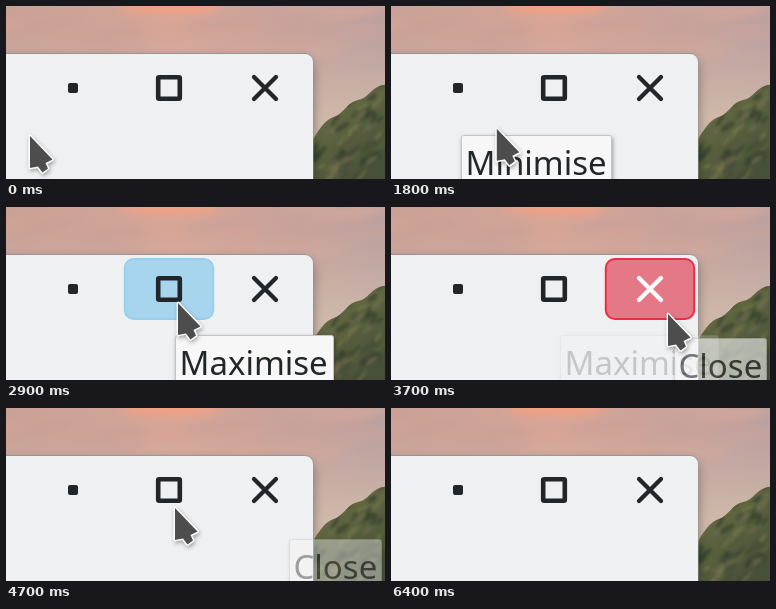
Recreate the animation shown at these times as an HTML page. Size 379x173 px, loop 6.7 s.

```html
<!DOCTYPE html>
<html lang="en">
<head>
<meta charset="utf-8">
<title>Title bar buttons</title>
<style>
  html, body { margin: 0; width: 100%; height: 100%; overflow: hidden; }
  svg { display: block; width: 379px; height: 173px; }
  text { font: 33px "Noto Sans", sans-serif; fill: #232629; }
</style>
</head>
<body>
<svg viewBox="0 0 379 173">
  <defs>
    <linearGradient id="sky">
      <stop stop-color="#c9a197"/>
      <stop offset=".45" stop-color="#d6a597"/>
      <stop offset="1" stop-color="#bba09f"/>
    </linearGradient>
    <linearGradient id="haze" x2="0" y2="1">
      <stop offset=".15" stop-color="#cdb4a9" stop-opacity="0"/>
      <stop offset=".65" stop-color="#cfb9aa"/>
    </linearGradient>
    <linearGradient id="slope" x2=".7" y2="1">
      <stop stop-color="#6f7444"/>
      <stop offset="1" stop-color="#48503a"/>
    </linearGradient>
    <filter id="soft" x="-50%" y="-150%" width="200%" height="400%"><feGaussianBlur stdDeviation="4"/></filter>
    <filter id="blur"><feGaussianBlur stdDeviation="1.4"/></filter>
    <filter id="shade"><feGaussianBlur stdDeviation="6"/></filter>
    <filter id="drop" x="-50%" y="-50%" width="200%" height="200%">
      <feDropShadow dx="1" dy="2" stdDeviation="2" flood-opacity=".35"/>
    </filter>
    <clipPath id="hillClip"><path id="hill"/></clipPath>
  </defs>

  <rect width="379" height="173" fill="url(#sky)"/>
  <g id="clouds" filter="url(#soft)">
    <ellipse cx="165" cy="1" rx="50" ry="6" fill="#f5a081"/>
  </g>
  <rect width="379" height="173" fill="url(#haze)"/>
  <use href="#hill" fill="url(#slope)"/>
  <g clip-path="url(#hillClip)"><g id="brush" filter="url(#blur)"></g></g>

  <rect x="-30" y="53" width="337" height="160" rx="9" filter="url(#shade)" opacity=".36"/>
  <rect x="-30" y="47" width="337.5" height="160" rx="9" fill="#949697"/>
  <rect x="-30" y="48" width="337" height="160" rx="8" fill="#eff0f1"/>

  <g id="hovers"></g>
  <rect x="62" y="77" width="10" height="10" rx="2" fill="#232629"/>
  <rect x="152.2" y="71.2" width="21.6" height="21.6" rx="1" fill="none" stroke="#232629" stroke-width="4.6"/>
  <g fill="none" stroke-width="4.3" stroke-linecap="round">
    <path id="cross" d="M248 71l22 22m0-22l-22 22" stroke="#232629"/>
    <use id="crossLight" href="#crossShape"/>
    <path id="crossShape" d="M248 71l22 22m0-22l-22 22" stroke="#fcfcfc"/>
  </g>
  <g id="tips"></g>
  <path id="cursor" d="M0 0V32L8 30.5 12.5 36.5 18 32.5 15.5 27 22.5 23.5Z" fill="#4d4d4d" stroke="#fff"
        stroke-width="2.6" stroke-linejoin="round" paint-order="stroke" filter="url(#drop)"/>
</svg>
<script>
const LOOP = 6700, STEP = 100;
const byId = id => document.getElementById(id);
const clamp = v => Math.max(0, Math.min(1, v));
const smooth = p => p * p * (3 - 2 * p);
const mix = (a, b, p) => a + (b - a) * p;

function add(parent, tag, attrs, text) {
  const el = document.createElementNS('http://www.w3.org/2000/svg', tag);
  for (const key in attrs) el.setAttribute(key, attrs[key]);
  if (text) el.textContent = text;
  parent.append(el);
  return el;
}

let seed = 11;
const random = (min = 0, max = 1) =>
  mix(min, max, (seed = seed * 16807 % 2147483647) / 2147483647);

function scatter(parent, count, colors, opacity, place) {
  for (let i = 0; i < count; i++) {
    const { cx, cy, rx, ry, angle } = place();
    add(parent, 'ellipse', {
      cx, cy, rx, ry, opacity, fill: colors[Math.floor(random(0, colors.length))],
      transform: `rotate(${angle} ${cx} ${cy})`
    });
  }
}

// Wallpaper: cloud streaks, then a hill with a slightly bumpy ridge
scatter(byId('clouds'), 22, ['#dda594', '#c59d96', '#d9a99b'], .5, () => ({
  cx: random(0, 379), cy: random(0, 48), rx: random(20, 50), ry: random(2, 5), angle: -5
}));

const ridge = x => 132 - 54 * ((x - 307) / 72) ** .75 + 1.5 * Math.sin(x / 4);
let outline = 'M307 173';
for (let x = 307; x <= 379; x += 3) outline += `L${x} ${ridge(x)}`;
byId('hill').setAttribute('d', outline + 'V173Z');

scatter(byId('brush'), 90, ['#333d2c', '#434b34', '#54603a', '#7b7d4c', '#6d6850'], .65, () => ({
  cx: random(305, 379), cy: random(75, 173), rx: random(4, 11), ry: random(1, 3.5), angle: random(-65, -25)
}));

// Highlights and tooltips fade in at each "on" and out at each "off"
const blue = { color: '#3daee9', line: '#6bbfee', alpha: .6, fade: 300 };
const hovers = [
  { ...blue, x: 23, shown: [{ on: 900, off: 1500 }] },
  { ...blue, x: 119, shown: [{ on: 2000, off: 2800 }, { on: 4700, off: 5700 }] },
  { x: 215, color: '#e0475a', line: '#ed2d43', alpha: .7, fade: 300, shown: [{ on: 3200, off: 4300 }] }
];
const tips = [
  { label: 'Minimise', x: 70, y: 129, w: 151, fade: 250, shown: [{ on: 1300, off: 2050 }] },
  { label: 'Maximise', x: 169, y: 128, w: 159, fade: 250, shown: [{ on: 2100, off: 3500 }] },
  { label: 'Close', x: 283, y: 131, w: 93, fade: 250, shown: [{ on: 3550, off: 4550 }] }
];

// Cursor moves; "dip" bends the way below the buttons
const home = { x: 24, y: 130 };
const moves = [
  { from: 700, to: 1200, x: 72, y: 97, dip: 0 },
  { from: 1480, to: 2300, x: 172, y: 96, dip: 30 },
  { from: 2900, to: 3500, x: 277, y: 107, dip: 20 },
  { from: 4200, to: 4700, x: 169, y: 100, dip: 20 },
  { from: 4900, to: 5500, x: 156, y: 190, dip: 0 },
  { from: 5700, to: 6200, x: -40, y: 122, dip: 0 }
];

for (const hover of hovers) {
  hover.el = add(byId('hovers'), 'g', {});
  add(hover.el, 'rect', {
    x: hover.x - .2, y: 52, width: 88.4, height: 60, rx: 9,
    fill: hover.color, 'fill-opacity': hover.alpha, stroke: hover.line, 'stroke-width': 2
  });
}
for (const tip of tips) {
  tip.el = add(byId('tips'), 'g', {});
  add(tip.el, 'rect', {
    x: tip.x + .5, y: tip.y + .5, width: tip.w - 1, height: 70, rx: 2,
    fill: '#f7f7f7', stroke: '#c3c4c5', filter: 'url(#drop)'
  });
  add(tip.el, 'text', { x: tip.x + 4.5, y: tip.y + 40 }, tip.label);
}
byId('crossLight').remove();

const opacityAt = ({ shown, fade }, time) => Math.max(...shown.map(({ on, off }) =>
  clamp((time - on) / fade) - clamp((time - off) / fade)));

function cursorAt(time) {
  let { x, y } = home;
  for (const move of moves) {
    const p = smooth(clamp((time - move.from) / (move.to - move.from)));
    x = mix(x, move.x, p);
    y = mix(y, move.y, p) + move.dip * Math.sin(Math.PI * p);
  }
  return `translate(${x} ${y})`;
}

function draw(now) {
  const time = Math.floor(now % LOOP / STEP) * STEP;
  for (const part of [...hovers, ...tips]) part.el.setAttribute('opacity', opacityAt(part, time));
  const lit = opacityAt(hovers[2], time);
  byId('crossShape').setAttribute('opacity', lit);
  byId('cross').setAttribute('opacity', 1 - lit);
  byId('cursor').setAttribute('transform', cursorAt(time));
}

const start = performance.now();
function tick() {
  draw(performance.now() - start);
  requestAnimationFrame(tick);
}
tick();
</script>
</body>
</html>
```
